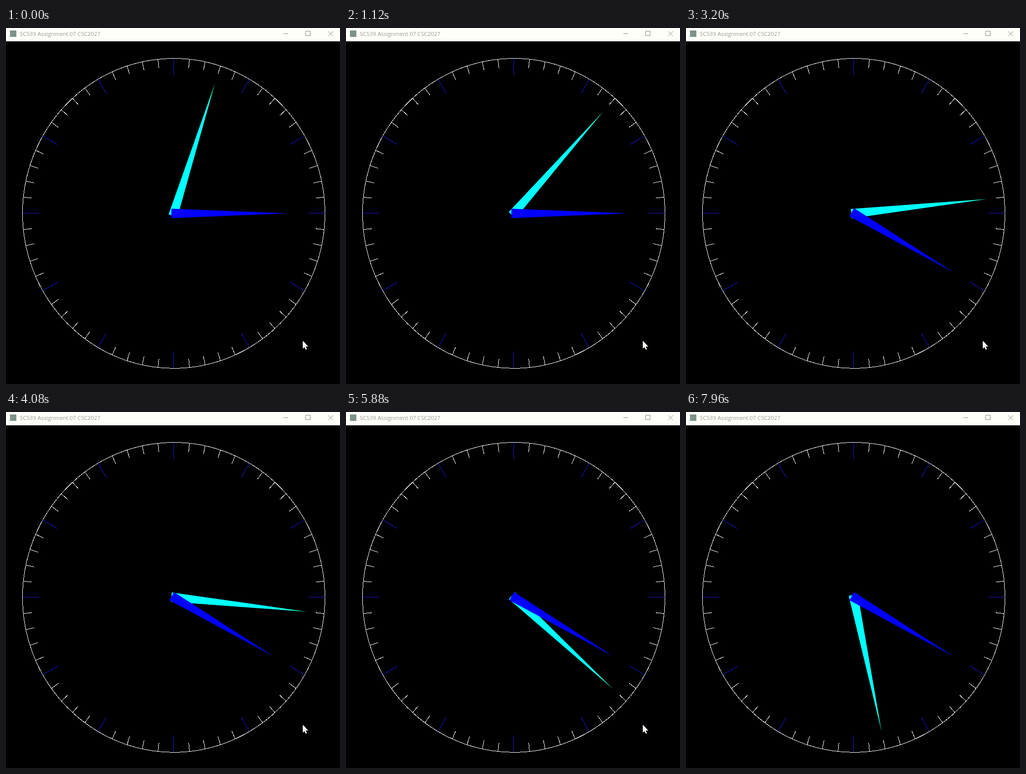
An HTML page that plays this animation: 676 px wide and 720 px high, repeating every 8 s.

```html
<!DOCTYPE html>
<html lang="en">
<head>
<meta charset="utf-8">
<title>Analog clock</title>
<style>
  html, body { margin: 0; width: 100%; height: 100%; overflow: hidden; background: #000; }
  svg { display: block; width: 100vw; height: 100vh; }
  .crisp { shape-rendering: crispEdges; }
  text { font-family: "Open Sans", "Noto Sans", sans-serif; }
</style>
</head>
<body>
<svg viewBox="0 0 676 720" preserveAspectRatio="none">
  <defs>
    <linearGradient id="tipFade" gradientUnits="userSpaceOnUse" x1="0" y1="-180" x2="0" y2="-271">
      <stop offset="0" stop-color="#00ffff"/>
      <stop offset="1" stop-color="#20ffc8"/>
    </linearGradient>
  </defs>
  <rect width="676" height="720"/>

  <!-- title bar -->
  <rect width="676" height="27" fill="#fffffa"/>
  <rect x="8" y="5" width="13" height="13" fill="#7d938a"/>
  <text x="28" y="16" font-size="11.35" fill="#999990">SC539 Assignment 07 CSC2027</text>
  <g class="crisp" fill="none" stroke="#8c8c80">
    <path d="M561 11.5H571"/>
    <rect x="606.5" y="6.5" width="9" height="9"/>
  </g>
  <path d="M652 6.5L662 16.5M662 6.5L652 16.5" stroke="#8c8c80"/>

  <!-- dial -->
  <ellipse id="rim" class="crisp" fill="none" stroke="#fff"/>
  <g id="ticks" class="crisp"></g>

  <!-- hands -->
  <polygon id="minute" points="-9.3,5 9.3,5 0,-271" fill="url(#tipFade)"/>
  <polygon id="hour" points="-9.3,4.7 9.3,4.7 0,-231" fill="#0000ff"/>

  <path id="cursor" d="M0 0V16L3.5 13L6 18L8.4 17L6 11.7H11.2Z" fill="#fffff8"/>
</svg>
<script>
  const LOOP = 8000;
  const CX = 339.5, CY = 374.9, RX = 306, RY = 313.4;
  const FIRST_MINUTE = 3;
  const HOUR_CHANGE = 2600;
  // times at which the minute hand advances by one mark
  const STEPS = [180, 480, 780, 1080, 1380, 1680, 1980, 2280, 2600, 2900, 3200, 3520, 4080,
    4400, 4720, 5000, 5320, 5560, 5880, 6200, 6520, 6800, 7120, 7360, 7720];

  const byId = id => document.getElementById(id);
  const minute = byId("minute"), hour = byId("hour"), cursor = byId("cursor");

  function setAttrs(node, attrs) {
    for (const key in attrs) node.setAttribute(key, attrs[key]);
  }

  function dialPoint(mark, scale) {
    const a = mark * Math.PI / 30;
    return [CX + RX * scale * Math.sin(a), CY - RY * scale * Math.cos(a)];
  }

  function addTick(mark) {
    const isHour = mark % 5 === 0;
    const [x1, y1] = dialPoint(mark, 1);
    const [x2, y2] = dialPoint(mark, isHour ? 0.89 : 0.944);
    const line = document.createElementNS("http://www.w3.org/2000/svg", "line");
    setAttrs(line, { x1, y1, x2, y2, stroke: isHour ? "#1818c8" : "#fff" });
    byId("ticks").append(line);
  }

  function turn(hand, degrees) {
    hand.setAttribute("transform", `translate(${CX} ${CY}) scale(1 ${RY / RX}) rotate(${degrees})`);
  }

  function draw(time) {
    const t = time % LOOP + 8;
    const mark = FIRST_MINUTE + STEPS.filter(s => t >= s).length;
    turn(minute, mark * 6);
    turn(hour, t >= HOUR_CHANGE ? 120 : 90);

    // the pointer leaves through the right edge
    cursor.setAttribute("transform", `translate(${t < 7760 ? 600.7 : 650} 632.6)`);
    cursor.setAttribute("visibility", t < 7800 ? "visible" : "hidden");
  }

  setAttrs(byId("rim"), { cx: CX, cy: CY, rx: RX, ry: RY });
  for (let mark = 0; mark < 60; mark++) addTick(mark);

  const start = performance.now();
  function tick() {
    draw(performance.now() - start);
    requestAnimationFrame(tick);
  }
  draw(0);
  requestAnimationFrame(tick);
</script>
</body>
</html>
```
